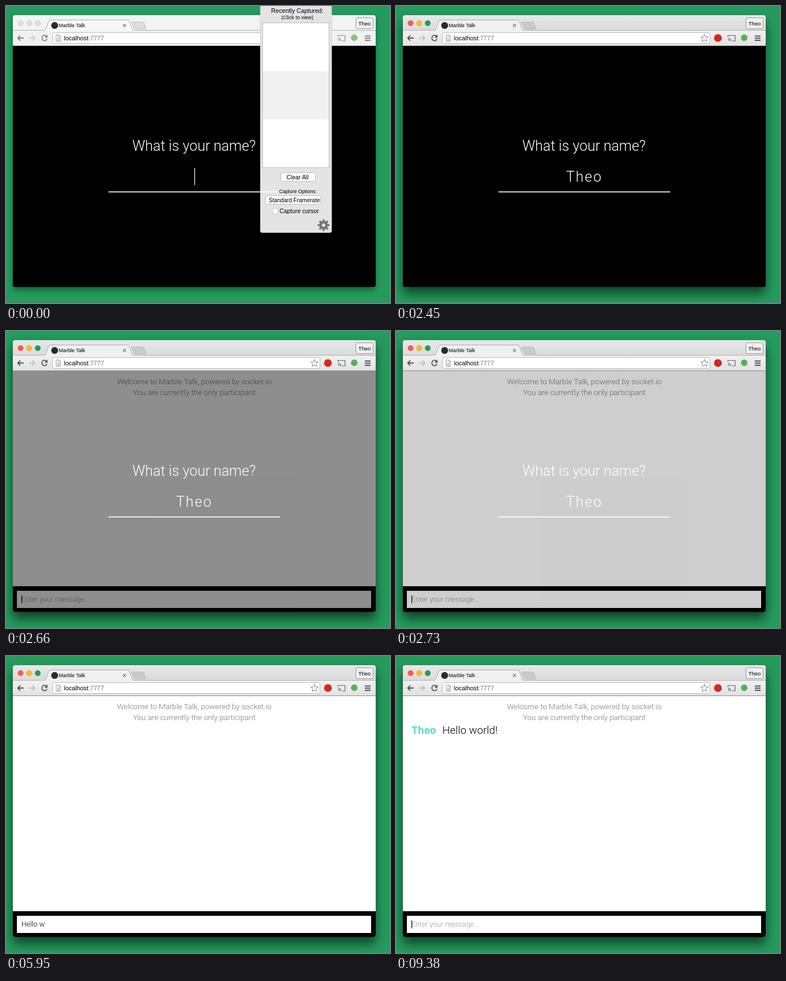
Recreate the animation shown at these times as an HTML page. Size 671x519 px, loop 9.52 s.

```html
<!DOCTYPE html>
<html lang="en">
<head>
<meta charset="utf-8">
<title>Marble Talk</title>
<style>
  html, body { margin: 0; width: 100%; height: 100%; overflow: hidden; background: #249a5c; }
  svg { display: block; width: 671px; height: 519px; }
  text { font-family: "Liberation Sans", Arial, sans-serif; white-space: pre; }
  .page text { font-family: Roboto, "Liberation Sans", sans-serif; font-weight: 300; }
  .mid { text-anchor: middle; }
  .btn { fill: #fff; stroke: #bdbdbd; }
  .icon { fill: none; stroke: #555; stroke-width: 1.8; }
  .lights circle { stroke-width: .6; }
  .idle .lights circle { fill: #dedede; stroke: #c4c4c4; }
  .idle .frame { fill: #f3f3f3; }
  .idle .tab { fill: #f8f8f8; }
  .idle .bar { fill: #f1f1f1; }
  .idle .tools { opacity: .7; }
  .idle .plus { fill: #dedede; }
</style>
</head>
<body>
<svg viewBox="0 0 671 519">
  <defs>
    <linearGradient id="chrome" x2="0" y2="1">
      <stop stop-color="#e8e8e8"/><stop offset="1" stop-color="#dadada"/>
    </linearGradient>
    <linearGradient id="bar" x2="0" y2="1">
      <stop stop-color="#f0f0f0"/><stop offset="1" stop-color="#e2e2e2"/>
    </linearGradient>
    <filter id="blur" x="-20%" y="-20%" width="140%" height="140%">
      <feGaussianBlur id="soft" stdDeviation="9"/>
    </filter>
    <clipPath id="win"><rect x="12" y="16" width="634" height="475" rx="4"/></clipPath>
  </defs>

  <rect width="671" height="519" fill="#249a5c"/>
  <rect id="shadow" x="12" y="26" width="634" height="476" rx="6" filter="url(#blur)"/>

  <g id="window" clip-path="url(#win)">
    <rect class="frame" x="12" y="16" width="634" height="28" fill="url(#chrome)"/>
    <g class="lights">
      <circle cx="25.5" cy="30" r="4.7" fill="#fb5a52" stroke="#e0443e"/>
      <circle cx="40.5" cy="30" r="4.7" fill="#f6b82f" stroke="#dea123"/>
      <circle cx="55.5" cy="30" r="4.7" fill="#249a5c" stroke="#1d8a50"/>
    </g>
    <path class="plus" d="M221 28H238Q240 28 241 30L244 38Q245 40 243 40H227Q225 40 224 38L220 30Q219 28 221 28Z" fill="#cacaca" stroke="#b2b2b2" stroke-width=".8"/>
    <rect class="bar" x="12" y="43" width="634" height="27" fill="url(#bar)"/>
    <path d="M12 42.5H646" stroke="#b0b0b0"/>
    <path class="tab" d="M67 43.5Q69 42 70 39L74 28Q75 24.5 78 24.5H212Q215 24.5 216 28L220 39Q221 42 223 43.5Z" fill="#f0f0f0"/>
    <path d="M67 42.5Q69 42 70 39L74 28Q75 24.5 78 24.5H212Q215 24.5 216 28L220 39Q221 42 223 42.5" fill="none" stroke="#adadad"/>
    <circle cx="85" cy="34" r="6" fill="#2a2a2a"/>
    <text x="92" y="37" font-size="9.1">Marble Talk</text>
    <path d="M204.5 31.5l5 5m0-5l-5 5" stroke="#777" stroke-width="1.1"/>
    <rect x="611.5" y="20.5" width="30" height="19" rx="2.5" fill="#f0f0f0" stroke="#999"/>
    <text class="mid" x="626.5" y="33.5" font-size="9.5">Theo</text>

    <rect x="81.5" y="46.5" width="467" height="19" rx="2" fill="#fff" stroke="#bcbcbc"/>
    <path d="M87.5 50.500H92.500L95.500 53.500V61.500H87.500ZM92.500 50.500V53.500H95.500M89 56h5m-5 2h5m-5 2h5" fill="none" stroke="#999" stroke-width=".9"/>
    <text x="101" y="60" font-size="10.9">localhost<tspan fill="#777">:7777</tspan></text>
    <g class="tools">
      <path class="icon" d="M31 56H21M25 51.500L20.500 56L25 60.500"/>
      <path class="icon" d="M40 56H50M46 51.500L50.500 56L46 60.500" style="stroke:#c2c2c2"/>
      <path class="icon" d="M71 53A4.700 4.700 0 1 0 71.700 57.500"/>
      <path d="M72.500 50V55.500H67Z" fill="#555"/>
      <path d="M539 49.500L540.800 54L545.600 54.300L541.900 57.400L543.100 62L539 59.400L534.900 62L536.100 57.400L532.400 54.300L537.200 54Z" fill="#fff" stroke="#888"/>
      <circle cx="562.5" cy="56" r="6.8" fill="#d5291c"/>
      <path d="M580 54V51.500H592.500V61H587M580 56a5 5 0 0 1 5 5M580 58.500a2.500 2.500 0 0 1 2.500 2.500" fill="none" stroke="#666" stroke-width="1.2"/>
      <circle cx="608.5" cy="55.5" r="5.7" fill="#54b157"/>
      <path d="M627 52.500H637M627 56.200H637M627 59.900H637" stroke="#555" stroke-width="2"/>
    </g>
    <path d="M12 69.500H646" stroke="#8a8a8a"/>

    <g class="page">
      <rect x="12" y="70" width="634" height="421" fill="#fff"/>
      <g class="mid" font-size="13.4" fill="#777">
        <text x="329" y="93">Welcome to Marble Talk, powered by socket.io</text>
        <text x="329" y="112">You are currently the only participant</text>
      </g>
      <g id="message" font-size="18.8">
        <text x="27" y="136" fill="#58dfc0" style="font-weight:700">Theo</text>
        <text x="81" y="136">Hello world!</text>
      </g>
      <rect x="12" y="446" width="634" height="45"/>
      <rect x="19" y="454" width="619" height="30" fill="#fff"/>
      <text id="hint" x="27" y="473" font-size="12.5" fill="#999">Enter your message...</text>
      <text id="draft" x="27" y="473" font-size="12.6"></text>
      <rect id="draftCaret" y="462" width="1" height="14"/>

      <g id="login">
        <rect x="12" y="70" width="634" height="421"/>
        <g class="mid" font-size="25" fill="#fff">
          <text x="328.500" y="253">What is your name?</text>
          <text id="name" x="329" y="307" letter-spacing="2"></text>
        </g>
        <rect x="179" y="324" width="300" height="1.6" fill="#fff"/>
        <rect id="nameCaret" y="283" width="1.2" height="30" fill="#fff"/>
      </g>
    </g>
  </g>

  <g id="popup">
    <rect x="444.500" y="-6" width="124.500" height="402" rx="3" fill="#e4e4e4" stroke="#c8d2cc" stroke-width=".8"/>
    <rect x="448.500" y="29.500" width="116" height="253" fill="#fff" stroke="#bbb"/>
    <rect x="449" y="114" width="115" height="84" fill="#f1f1f1"/>
    <rect x="445" y="324" width="30" height="1.4" fill="#fff"/>
    <rect class="btn" x="480.500" y="291.500" width="60" height="15" rx="3"/>
    <rect class="btn" x="453" y="331.500" width="96.500" height="15" rx="3"/>
    <rect class="btn" x="465.500" y="353.500" width="10" height="10" rx="2"/>
    <g class="mid">
      <text x="509" y="12" font-size="10.7">Recently Captured:</text>
      <text x="509" y="23" font-size="9">(Click to view)</text>
      <text x="509.500" y="303" font-size="10.3">Clear All</text>
      <text x="510" y="327" font-size="8.7">Capture Options:</text>
    </g>
    <text x="459" y="343" font-size="10">Standard Framerate</text>
    <text x="478" y="362" font-size="10.4">Capture cursor</text>
    <g fill="none" stroke="#757575">
      <circle cx="555" cy="383" r="5.300" stroke-width="4.600"/>
      <circle cx="555" cy="383" r="8.300" stroke-width="4" pathLength="16" stroke-dasharray="1" stroke-dashoffset=".5"/>
    </g>
  </g>
</svg>
<script>
const LOOP = 9520, TICK = 70;
const $ = id => document.getElementById(id);

// Each step: start time, text, caret shown
const nameSteps = [
  [0, "", 1], [1400, "", 0], [1540, "T", 1], [1820, "Th", 1],
  [1960, "The", 1], [2100, "Theo", 1], [2450, "Theo", 0]
];
const draftSteps = [
  [0, "", 1], [3430, "", 0], [3570, "H", 1], [3710, "He", 1],
  [3990, "Hel", 1], [4200, "Hell", 1], [4410, "Hello", 1], [4690, "Hello ", 1],
  [5250, "Hello ", 0], [5460, "Hello w", 1], [5950, "Hello w", 0],
  [6090, "Hello wo", 1], [6160, "Hello wor", 1], [6300, "Hello worl", 1],
  [6370, "Hello world", 1], [6720, "Hello world!", 1], [7140, "", 1],
  [7840, "", 0], [8330, "", 1], [8890, "", 0], [9380, "", 1]
];

const swing = (t, start, length) => {
  const p = Math.min(1, Math.max(0, (t - start) / length));
  return (1 - Math.cos(Math.PI * p)) / 2;
};

function type(id, steps, t, place) {
  const [, text, caret] = steps.findLast(s => s[0] <= t);
  const field = $(id), mark = $(id + "Caret");
  field.textContent = text;
  mark.setAttribute("x", place(text ? field.getComputedTextLength() : 0));
  mark.style.opacity = caret;
  return text;
}

function draw(t) {
  const idle = t < 840;
  $("window").classList.toggle("idle", idle);
  $("soft").setAttribute("stdDeviation", idle ? 5 : 9);
  $("shadow").setAttribute("y", idle ? 21 : 27);
  $("shadow").style.opacity = idle ? .35 : .55;
  $("popup").style.opacity = Math.max(0, 1 - t / 140);

  type("name", nameSteps, t, w => 329 + w / 2);
  const draft = type("draft", draftSteps, t, w => 27 + Math.round(w));
  $("hint").style.opacity = draft ? 0 : 1;
  $("login").style.opacity = 1 - swing(t, 2445, 400);
  $("message").style.opacity = swing(t, 7135, 150);
}

function tick() {
  const t = performance.now() % LOOP;
  draw(Math.floor(t / TICK) * TICK);
  requestAnimationFrame(tick);
}
tick();
</script>
</body>
</html>
```
